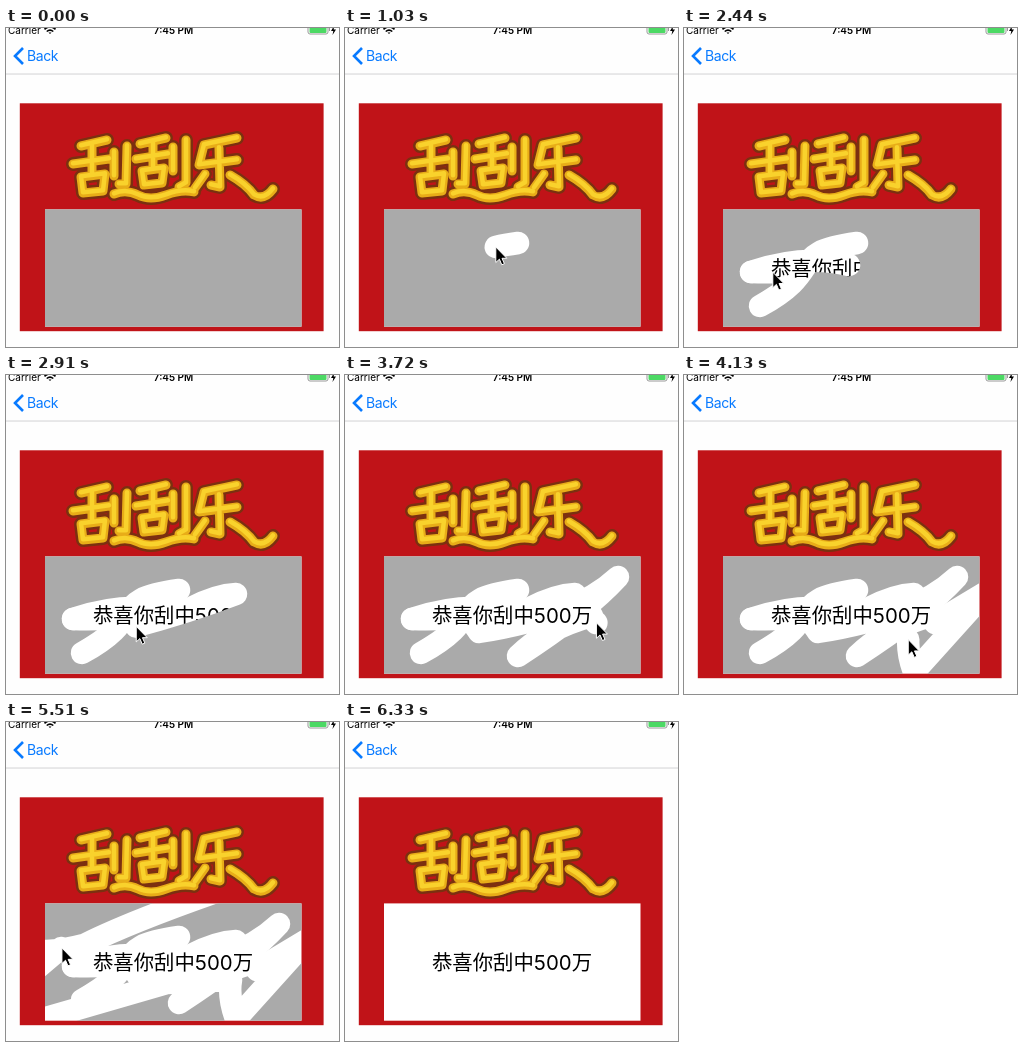
Write an HTML page that moves like this. It is 333 by 319 pixels and loops after 6970 ms.

```html
<!DOCTYPE html>
<html lang="zh">
<head>
<meta charset="utf-8">
<style>
  html, body { margin: 0; width: 100%; height: 100%; overflow: hidden; background: #fefefe; }
  svg { display: block; width: 333px; height: 319px; font-family: Inter, "Noto Sans CJK SC", "Noto Sans CJK", sans-serif; }
  .strokes { fill: none; stroke-linecap: round; stroke-linejoin: round; }
</style>
</head>
<body>
<svg viewBox="0 0 333 319">
  <defs>
    <g id="title">
      <path d="M75 118L101 112M67 136L103 131M86 118V146M75 149L99 146L97 163L77 165ZM108 124V148M121 118L120 156L113 156"/>
      <path d="M134 116L160 110M130 131L162 126M147 113V140M136 143L158 140L156 155L138 157ZM167 119V143M180 112V155L173 159"/>
      <path d="M231 110L198 117L193 137L231 132M213 120L214 159L205 157M199 146L189 160M224 147Q240 156 248 167Q258 173 267 161"/>
      <path d="M108 166Q120 161 132 167T160 167T188 164"/>
    </g>
    <mask id="holes" maskUnits="userSpaceOnUse" x="39" y="181" width="257" height="118">
      <rect x="39" y="181" width="257" height="118" fill="#fff"/>
      <g id="scratches" class="strokes" stroke-width="22.5"/>
    </mask>
  </defs>

  <path d="M0 46H333" stroke="#d2d2d4"/>
  <text x="2" y="6" font-size="10">Carrier</text>
  <g fill="none" stroke="#000" stroke-width="1.6">
    <path d="M38.500 1.300Q44 -3.500 49.500 1.300M40.700 3.500Q44 .8 47.300 3.500"/>
    <path d="M42.500 4.500L44 6L45.500 4.500Z" fill="#000" stroke="none"/>
  </g>
  <text id="clock" x="167.500" y="6" font-size="10" font-weight="600" text-anchor="middle">7:45 PM</text>
  <rect x="302" y="-3" width="20" height="9" rx="2" fill="#fff" stroke="#999"/>
  <rect x="303.500" y="-2" width="17" height="7" rx="1" fill="#4cd964"/>
  <path d="M323.500 0v3" stroke="#999"/>
  <path d="M328 -2L325 3H327.300L326.500 7L330 1.500H327.700Z"/>
  <path d="M17 20L9 28L17 36" fill="none" stroke="#087aff" stroke-width="2.600"/>
  <text x="21" y="33" font-size="14" letter-spacing="-.4" fill="#087aff">Back</text>

  <rect x="13.800" y="75.300" width="303.800" height="227.900" fill="#c01318"/>
  <g class="strokes">
    <use href="#title" stroke="#7b3010" stroke-width="14"/>
    <use href="#title" stroke="#e8ad18" stroke-width="9"/>
    <use href="#title" stroke="#f9d22c" stroke-width="4.500" y="-.7"/>
  </g>

  <rect x="39" y="181.400" width="256.500" height="117.300" fill="#fff"/>
  <text x="167" y="247.500" font-size="20.400" text-anchor="middle">恭喜你刮中500万</text>
  <rect id="cover" x="39" y="181.400" width="256.500" height="117.300" fill="#aaa" mask="url(#holes)"/>
  <path id="cursor" d="M0 0V15.500L3.600 12.200L6 17.800L8.600 16.700L6.200 11.300H11Z" stroke="#fff"/>
</svg>
<script>
const LOOP = 6970, CLEARED = 5700, CLOCK_TICK = 6160;
const SHOWN = 330, HIDDEN = 6330;
const $ = id => document.getElementById(id);

const gestures = [];
function gesture(start, end, d, pressed) {
  const path = document.createElementNS('http://www.w3.org/2000/svg', 'path');
  path.setAttribute('d', d);
  path.setAttribute('pathLength', 1);
  path.setAttribute('stroke', pressed ? '#000' : 'none');
  $('scratches').append(path);
  gestures.push({ start, end, path, length: path.getTotalLength() });
}
const hover = (start, end, d) => gesture(start, end, d, false);
const scratch = (start, end, d) => gesture(start, end, d, true);

hover(330, 710, 'M283 281L172 218');
scratch(890, 1640, 'M173 215C100 225 145 240 76 278');
hover(1640, 1800, 'M76 278L165 237');
scratch(1830, 2400, 'M165 237Q120 226 67 244');
scratch(2400, 2910, 'M67 244Q120 246 185 233Q210 220 230 219Q180 238 130 251');
scratch(2910, 3712, 'M130 251L134 257Q230 242 273 202Q240 238 173 281Q200 254 247 241');
scratch(3720, 4540, 'M251 248L301 218L230 297Q222 275 225 258L161 261L40 296');
hover(4540, 4610, 'M40 296L26 247');
hover(4610, 5150, 'M26 247Q100 240 219 191');
scratch(5180, 5510, 'M236 161Q130 197 78 223Q55 229 40 229L30 247L55 226');
hover(5510, 5740, 'M55 226L270 235');
hover(6160, 6300, 'M270 235L279 262');

function draw(now) {
  const time = now % LOOP;
  for (const { start, end, path, length } of gestures) {
    const progress = Math.min((time - start) / (end - start), 1);
    path.style.display = progress > 0 ? '' : 'none';
    if (progress < 0) continue;
    path.setAttribute('stroke-dasharray', `${progress} 2`);
    const { x, y } = path.getPointAtLength(progress * length);
    $('cursor').setAttribute('transform', `translate(${x} ${y})`);
  }
  $('cover').style.display = time < CLEARED ? '' : 'none';
  $('cursor').style.display = time >= SHOWN && time < HIDDEN ? '' : 'none';
  $('clock').textContent = time < CLOCK_TICK ? '7:45 PM' : '7:46 PM';
  requestAnimationFrame(draw);
}
draw(performance.now());
</script>
</body>
</html>
```
